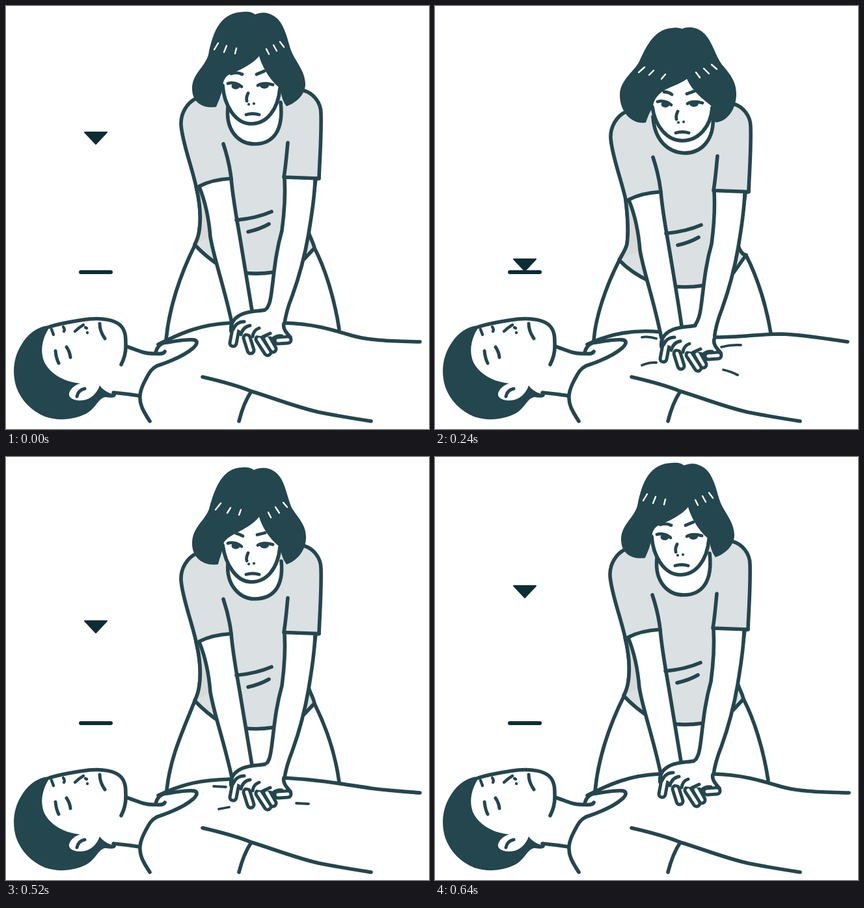
An HTML page that plays this animation: 650x650 px, repeating every 680 ms.

```html
<!DOCTYPE html>
<html lang="en">
<head>
<meta charset="utf-8">
<title>Chest compressions</title>
<style>
html, body { margin: 0; width: 100%; height: 100%; overflow: hidden; background: #fff; }
svg { display: block; width: 100%; height: 100%; }
</style>
</head>
<body>
<svg id="stage" viewBox="0 0 650 650"></svg>
<script>
const INK = '#24464e', DARK = '#0b2d35', SHIRT = '#dbe0e3', SIDE = '#d9d9d9';
const stage = document.getElementById('stage');

const path = (d, fill, stroke, width) =>
  `<path d="${d}" fill="${fill}" stroke="${stroke}" stroke-width="${width}"/>`;
const line = (d, w = 5.6) => path(d, 'none', INK, w);
const fill = (d, c = '#fff') => path(d, c, 'none', 0);
const shape = (d, c = '#fff') => path(d, c, INK, 5.6);
const group = (x, y, body) => `<g transform="translate(${x} ${y})">${body}</g>`;

// Lying person, never moves
const patient = () =>
  fill('M69 491C50 491 34 503 24 520C11 540 9 565 16 586C23 605 38 622 60 631C80 638 105 636 124 626C139 617 142 602 153 601C160 602 169 603 169 597C160 596 150 592 144 583C140 595 130 605 117 606C106 607 96 603 97 595C99 588 106 582 114 580C85 577 65 562 58 545C52 528 56 508 69 491Z', INK) +
  fill('M114 583C105 585 97 592 97 598C99 605 109 606 116 605C127 604 137 596 141 585Z') +
  line('M109 600Q111 590 121 588', 5) +
  line('M67 493C85 487 105 484 128 481C150 479 167 483 175 490C185 499 184 512 184 524C184 535 181 543 177 551') +
  line('M185 523C200 528 212 535 228 534C236 535 243 534 244 531') +
  line('M165 594Q186 596 205 599') +
  line('M230 533C232 522 240 517 248 517C265 514 280 512 289 513C296 515 293 521 287 526C272 539 250 547 232 553C222 558 219 566 214 575C206 590 203 602 209 617C213 626 217 632 221 638') +
  line('M302 570C328 576 355 583 377 592C410 602 445 616 480 624C510 630 535 634 561 638M377 592Q365 610 358 638') +
  line('M144 488C144 497 147 504 152 511M76 530Q77 541 81 549M93 524Q98 531 99 540', 5) +
  line('M70 497L73 505M88 493Q91 497 89 500M106 500Q112 494 119 490M122 494L124 495M125 502V502', 4.4);

function torso({ hipL, hipR, waist, reach }) {
  const [lx, ly] = hipL, [rx, ry] = hipR;
  const side = `C${waist + 1} 302 ${waist + 3} 325 ${waist} 345C${waist - 1} 353 ${lx + 3} ${ly - 6} ${lx} ${ly}`;
  const armL = `M297 278C306 300 312 330 314 355C320 390 335 430 347 ${487 + reach}`;
  const armR = `M428 265C430 300 426 330 424 345C414 380 412 410 408 440C406 455 404 462 398 ${468 + reach}`;
  return shape(`M292 142C278 149 268 165 269 183C271 210 285 245 292 277${side}Q${lx + 19} ${ly + 20} 330 ${ly + 33}C350 410 380 414 411 409C432 405 450 395 458 389L${rx} ${ry}C472 362 467 356 465 347L476 266L481 265C482 235 485 200 484 165C484 148 472 134 458 130`, SHIRT) +
    fill(`M294 278${side}L314 355L299 279Z`, SIDE) +
    line(`M292 277${side}`) +
    fill(`${armL}L378 ${468 + reach}C372 430 366 395 361 365C357 340 349 300 346 265Q315 267 297 278Z`) +
    fill(`${armR}L428 ${488 + reach}C430 472 434 460 440 445C449 420 459 385 465 350C468 330 474 300 475 266Z`) +
    line(`${armL}M346 265C349 300 357 340 361 365C366 395 372 430 378 ${468 + reach}`) +
    line(`${armR}M475 266C474 300 468 330 465 350C459 385 449 420 440 445C434 460 430 472 428 ${488 + reach}`) +
    line('M297 277C312 269 330 266 346 265C344 247 340 230 334 212M481 265L427 263C430 245 431 230 433 210') +
    line('M354 329Q385 326 408 316M372 347Q390 343 404 335');
}

const finger = d => line(d, 15) + path(d, 'none', '#fff', 5);
const hands = () =>
  fill('M346 500C344 486 352 478 364 473C376 468 390 469 398 467L425 470L425 494L436 508L418 516L370 512Z') +
  ['M353 497L349 518', 'M370 510L376 529', 'M401 511L410 527', 'M389 512L402 532', 'M418 514L433 513'].map(finger).join('') +
  fill('M350 493C354 482 368 474 399 472L422 474L422 492L430 506C405 510 370 508 350 493Z') +
  line('M346 500C344 486 352 478 364 473C376 468 390 469 398 467M427 488C425 496 431 502 437 509') +
  line('M349 497Q354 485 366 485M361 505Q364 493 375 491M379 508Q380 498 389 495M395 508L406 503M410 511Q416 506 424 507', 5);

const face = brows =>
  line(brows + 'M341 119Q352 116 362 124M387 122Q396 117 410 121M372 134C370 138 369 142 370 146M369 167Q379 164 389 167', 4.8) +
  line('M373 151V151M381 150V150', 4.2) +
  `<ellipse cx="353" cy="123" rx="6.5" ry="5" fill="${INK}"/><ellipse cx="397" cy="122" rx="7" ry="5" fill="${INK}"/>`;

const poses = [
  {
    shift: [0, 0], hipL: [290, 367], hipR: [474, 372], waist: 297, reach: 0, hand: [0, 0],
    legs: 'M290 368C268 412 250 465 246 514M474 372C490 402 505 450 512 497',
    chest: 'M234 520C270 502 300 489 345 487M428 487C470 488 500 497 530 506C560 515 600 515 636 516',
    marks: '',
    neck: 'M341 155C337 192 358 212 382 212C410 212 427 192 422 148',
    chin: 'M333 122C335 152 352 181 377 181C400 181 418 160 421 126',
    hair: 'M365 9C372 8 378 9 383 13C392 9 402 9 411 15C424 22 430 40 436 62C441 82 460 98 460 120C460 136 446 149 431 154C426 148 423 138 421 126C408 117 394 95 389 77C380 88 360 99 345 104C337 108 333 115 333 125C331 138 326 147 323 155C305 158 286 150 286 127C286 104 305 95 311 75C318 38 330 10 365 9Z',
    shine: 'M326 57L320 67M339 61L335 71M354 65L352 73M400 66L404 74M411 60L416 69M421 55L427 63',
    face: [0, 0], brows: 'M346 104Q355 101 363 105M385 105L397 100'
  },
  {
    shift: [0, 6.5], hipL: [290, 368], hipR: [474, 372], waist: 297, reach: -1, hand: [0, 5],
    legs: 'M290 375C272 420 252 462 247 512M474 379C492 415 506 455 512 500',
    chest: 'M234 520C272 502 300 496 345 495M428 493C480 496 515 502 560 509C590 513 610 514 636 516',
    marks: 'M319 506L338 507M327 541L343 538M446 532L465 533',
    neck: 'M341 163C338 198 360 218 382 218C410 218 427 200 423 160',
    chin: 'M333 135C337 165 354 192 377 192C400 192 418 172 421 138',
    hair: 'M363 16C371 15 377 17 381 20C390 16 402 15 412 22C428 32 430 55 439 78C449 94 461 104 461 123C461 145 446 160 431 165C426 158 423 150 421 138C408 129 394 110 389 92C380 104 363 112 348 120C338 126 333 131 333 138C332 148 327 158 326 165C306 168 286 157 286 133C286 108 305 99 312 80C322 43 334 17 363 16Z',
    shine: 'M330 71L322 81M345 78L340 86M361 81L358 89M403 85L407 93M414 77L420 86M426 70L432 77',
    face: [0, 13.5], brows: 'M354 104Q359 105 364 108M386 106L398 103'
  },
  {
    shift: [1, 20.5], hipL: [282, 370], hipR: [477, 362], waist: 294, reach: 3, hand: [2, 24],
    legs: 'M283 391C262 432 246 480 244 515M478 383C497 420 510 465 516 503',
    chest: 'M234 520C270 503 305 497 347 501M433 509C470 509 500 504 530 504C570 505 610 513 634 516',
    marks: 'M318 509Q328 507 340 511M318 552Q330 547 340 548M440 524Q455 520 470 521M443 559Q456 562 465 567',
    neck: 'M335 170C337 206 358 225 383 226C410 226 430 205 427 168',
    chin: 'M334 155C338 185 357 207 380 207C405 207 424 185 426 156',
    hair: 'M363 34C371 32 376 34 380 35C388 31 402 32 411 40C426 52 430 75 441 90C452 103 463 115 463 135C463 160 448 178 431 179C428 174 427 165 425 154C412 143 395 131 387 112C378 119 367 122 355 128C344 134 336 143 335 154C330 163 326 172 324 179C304 183 284 164 284 137C284 114 305 102 314 85C326 59 338 36 363 34Z',
    shine: 'M322 94L313 102M336 99L329 106M354 105L348 112M401 102L407 110M413 96L421 104M425 90L433 97',
    face: [1, 28], brows: 'M351 104Q358 104 363 108M386 107L397 103'
  }
];

const rescuer = p => `<g class="pose">` +
  line(p.legs) + line(p.chest) +
  group(...p.shift, torso(p)) +
  group(...p.hand, hands()) +
  line(p.marks, 3.8) +
  shape(p.neck) + fill(p.chin + 'V110H338Z') + line(p.chin) +
  fill(p.hair, INK) + path(p.shine, 'none', '#fff', 2.4) +
  group(...p.face, face(p.brows)) + '</g>';

stage.innerHTML = `<rect width="650" height="650" fill="#fff"/>
  <g stroke-linecap="round" stroke-linejoin="round">${poses.map(rescuer).join('')}${patient()}
  ${path('M115 409H161', 'none', DARK, 6)}
  <g id="arrow">${path('M121 0H155L138 18Z', DARK, DARK, 2)}</g></g>`;

const figures = [...stage.querySelectorAll('.pose')];
const arrow = document.getElementById('arrow');

// start time (ms), arrow top, pose
const steps = [
  [0, 194, 0], [160, 273, 1], [200, 340, 1], [240, 389, 2],
  [480, 292, 1], [520, 252, 1], [560, 224, 0], [600, 207, 0], [640, 198, 0]
];

function draw(ms) {
  const t = ms % 680;
  const [, y, pose] = steps.filter(s => s[0] <= t).pop();
  arrow.setAttribute('transform', `translate(0 ${y})`);
  figures.forEach((f, i) => f.style.display = i === pose ? '' : 'none');
}

const start = performance.now();
function tick() {
  draw(performance.now() - start);
  requestAnimationFrame(tick);
}
tick();
</script>
</body>
</html>
```
